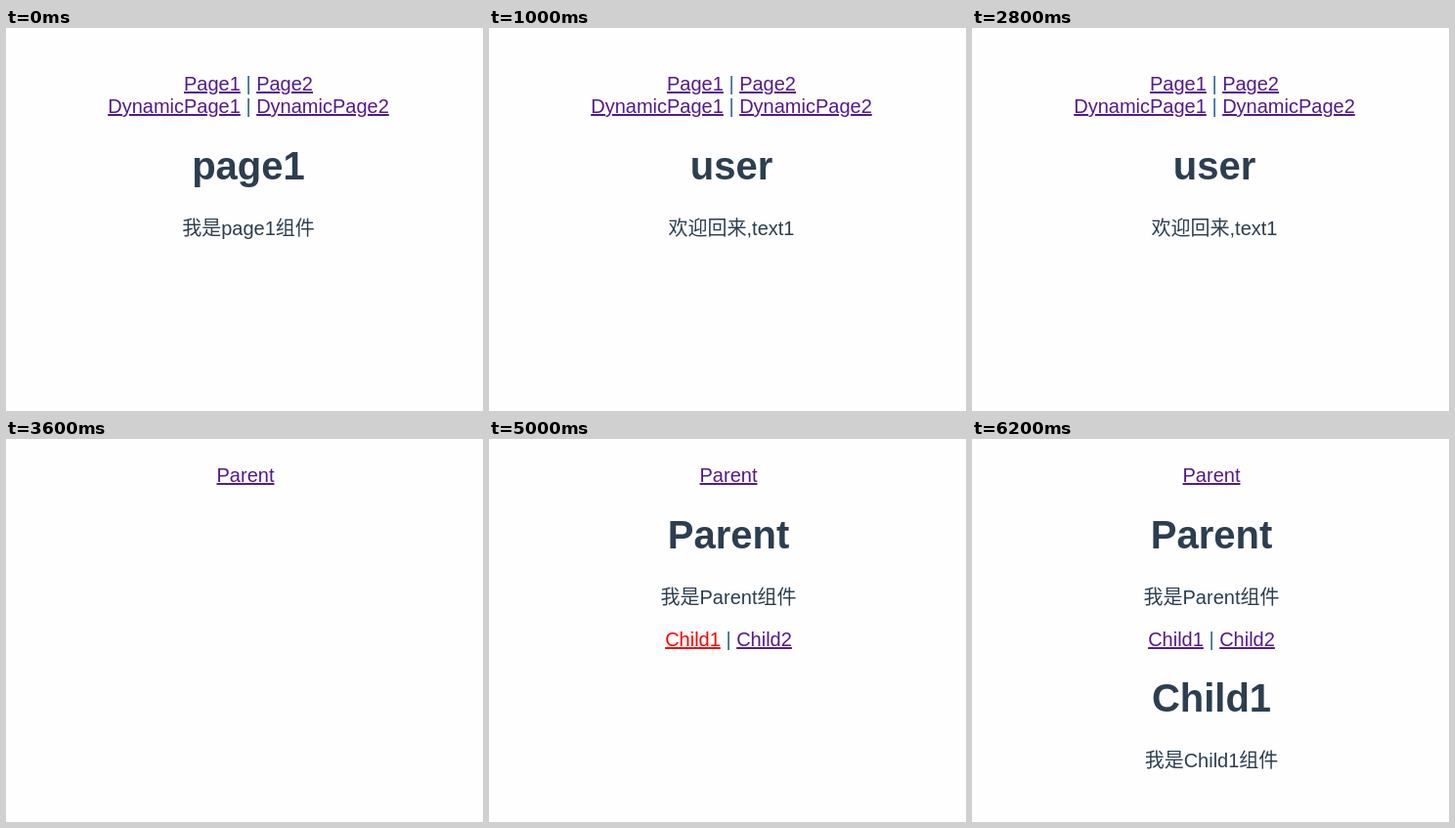
Write an HTML page that moves like this. It is 488 px wide and 392 px high and loops after 7400 ms.

```html
<!DOCTYPE html>
<html lang="zh-CN">
<head>
<meta charset="utf-8">
<title>Router demo</title>
<style>
  html, body { margin: 0; width: 100%; height: 100%; overflow: hidden; background: #fefefe; }
  body {
    color: #2c3e50;
    font: 20px/22px "Liberation Sans", Arial, "Noto Sans CJK SC", "Noto Sans CJK", sans-serif;
    text-align: center;
  }
  /* The two views are centred on slightly different axes */
  main { position: absolute; top: 0; width: 480px; }
  .pages { left: 8px; }
  .nested { left: 5px; }

  h1, p {
    position: absolute;
    left: 0;
    top: var(--y);
    width: 100%;
    margin: 0;
    white-space: nowrap;
  }
  h1 { font-size: 40px; line-height: 44px; }

  a { color: #551a8b; text-decoration: underline; }
  i { font-style: normal; color: #2f6690; }

  /* All changes are hard cuts within one 7.4 s loop */
  .show { visibility: hidden; }
  .show, .press { animation: var(--a) 7.4s step-end infinite; }

  @keyframes nav    { 0% { visibility: visible } 48.648% { visibility: hidden } }
  @keyframes page   { 0% { visibility: visible } 13.513% { visibility: hidden } }
  @keyframes user   { 13.513% { visibility: visible } 48.648% { visibility: hidden } }
  @keyframes text1  {
    13.513%, 37.837% { visibility: visible }
    28.378%, 48.648% { visibility: hidden }
  }
  @keyframes text2  { 28.378% { visibility: visible } 37.837% { visibility: hidden } }
  @keyframes root   { 48.648%, 100% { visibility: visible } }
  @keyframes parent { 58.108%, 100% { visibility: visible } }
  @keyframes child1 {
    68.918%, 83.783%, 100% { visibility: visible }
    78.378% { visibility: hidden }
  }
  @keyframes child2 { 78.378% { visibility: visible } 83.783% { visibility: hidden } }

  /* Links turn red for 100 ms while pressed */
  @keyframes press-dyn1 {
    12.162%, 36.486% { color: #f00 }
    13.513%, 37.837% { color: #551a8b }
  }
  @keyframes press-dyn2   { 27.027% { color: #f00 } 28.378% { color: #551a8b } }
  @keyframes press-parent { 56.756% { color: #f00 } 58.108% { color: #551a8b } }
  @keyframes press-child1 { 67.567% { color: #f00 } 68.918% { color: #551a8b } }
  @keyframes press-child2 { 77.027% { color: #f00 } 78.378% { color: #551a8b } }
</style>
</head>
<body>
  <main class="pages">
    <p class="show" style="--a:nav; --y:46px"><a>Page1</a> <i>|</i> <a>Page2</a></p>
    <p class="show" style="--a:nav; --y:69px"><a class="press" style="--a:press-dyn1">DynamicPage1</a> <i>|</i> <a class="press" style="--a:press-dyn2">DynamicPage2</a></p>

    <h1 class="show" style="--a:page; --y:119px">page1</h1>
    <p class="show" style="--a:page; --y:194px">我是page1组件</p>

    <h1 class="show" style="--a:user; --y:119px">user</h1>
    <p class="show" style="--a:text1; --y:194px">欢迎回来,text1</p>
    <p class="show" style="--a:text2; --y:194px">欢迎回来,text2</p>
  </main>

  <main class="nested">
    <p class="show" style="--a:root; --y:26px"><a class="press" style="--a:press-parent">Parent</a></p>
    <h1 class="show" style="--a:parent; --y:76px">Parent</h1>
    <p class="show" style="--a:parent; --y:151px">我是Parent组件</p>
    <p class="show" style="--a:parent; --y:194px"><a class="press" style="--a:press-child1">Child1</a> <i>|</i> <a class="press" style="--a:press-child2">Child2</a></p>

    <h1 class="show" style="--a:child1; --y:243px">Child1</h1>
    <p class="show" style="--a:child1; --y:318px">我是Child1组件</p>
    <h1 class="show" style="--a:child2; --y:243px">Child2</h1>
    <p class="show" style="--a:child2; --y:318px">我是Child2组件</p>
  </main>
</body>
</html>
```
